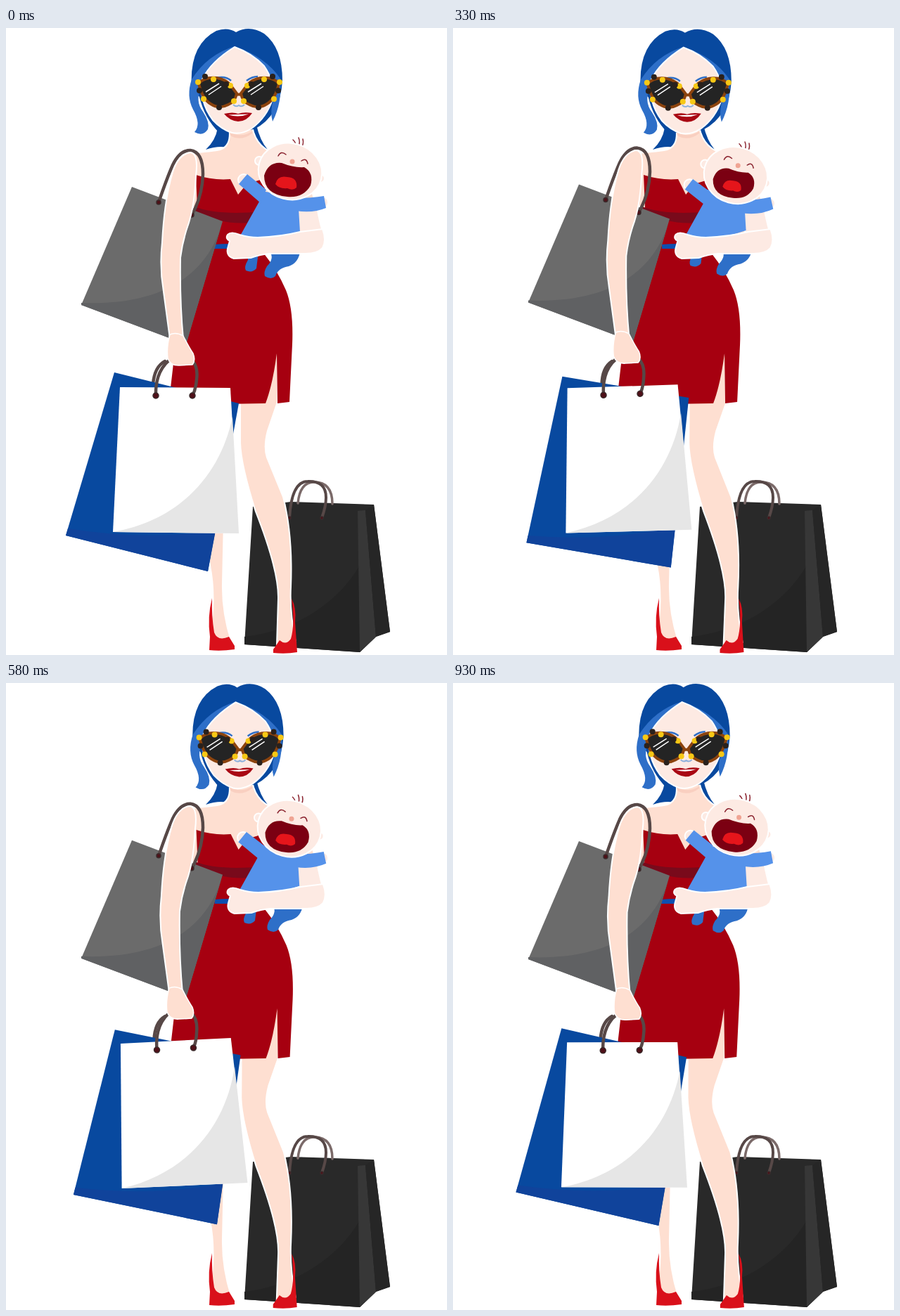
Write an HTML page that moves like this. It is 627 px wide and 892 px high and loops after 0.96 s.

```html
<!DOCTYPE html>
<html lang="en">
<head>
<meta charset="utf-8">
<title>Shopping with a baby</title>
<style>
html, body { margin: 0; width: 100%; height: 100%; overflow: hidden; background: #fff; }
svg { display: block; width: 627px; height: 892px; }
.skin { fill: #fedfd1; stroke: #fff; stroke-width: 2; }
.pale { fill: #fdeae3; stroke: #fff; stroke-width: 2; }
.red { fill: #a60010; }
.shoe { fill: #d9101a; }
.navy { fill: #08499f; }
.lock { fill: #2e6fc8; }
.sleeve { fill: #5592ea; }
.line { fill: none; stroke: #574847; stroke-width: 4.5; stroke-linecap: round; }
.thin { fill: none; stroke: #8b2430; stroke-width: 1.5; stroke-linecap: round; }
.stud { fill: #4f1018; stroke: #3a2a2b; stroke-width: 1.5; }
</style>
</head>
<body>
<svg viewBox="0 0 627 892">
  <defs>
    <path id="lens" d="M274 79Q282 69 300 71Q312 73 319 81L328 93Q326 105 316 109Q303 116 291 108Q279 101 274 79Z"/>
    <clipPath id="lensClip"><use href="#lens"/></clipPath>
  </defs>

  <g id="blackBag">
    <path fill="#292929" d="M351 681L405 674L523 678L546 859L526 866L503 888L339 877Z"/>
    <path fill="#242424" d="M516 735C496 798 428 856 339 866L339 877L503 888L526 866Z"/>
    <path fill="#373737" d="M500 687L511 686L526 866L503 888Z"/>
    <path fill="#262626" d="M511 686L523 678L546 859L526 866Z"/>
    <path class="line" style="stroke:#7b6a69;stroke-width:3.5" d="M415 676Q418 646 438 646Q464 646 464 677"/>
    <path class="line" style="stroke-width:4" d="M403 697Q406 645 429 645Q455 644 455 668Q455 680 449 697"/>
    <circle class="stud" cx="403" cy="697" r="2"/><circle class="stud" cx="449" cy="697" r="2"/>
  </g>

  <path class="skin" d="M282 700L290 765Q297 800 293 840L293 876L320 872Q307 830 308 790L310 700Z"/>
  <path class="shoe" d="M293 811Q286 838 290 866L289 885Q305 887 325 884V879L317 866Q301 873 296 860Q292 835 293 811Z"/>
  <g id="leg">
    <path class="skin" d="M333 500L333 590Q334 622 355 688Q388 772 387 812L385 878L412 874Q403 830 405 795Q408 722 394 667L371 611Q366 596 372 573L386 532V455Z"/>
    <path class="shoe" d="M406 812Q413 824 411 845L414 888Q398 891 380 889V884L389 871Q398 879 405 869Q411 848 406 812Z"/>
  </g>

  <path class="navy" d="M301 142Q298 160 284 173Q304 166 320 171V140ZM349 140V166Q360 168 372 173Q361 160 356 138Z"/>
  <path class="skin" d="M317 140Q322 171 300 174Q275 177 262 178Q245 184 240 212L270 262L420 300L450 300Q450 270 440 250Q425 190 390 180Q356 174 350 140Z"/>
  <path fill="#f9cfc0" d="M318 148Q334 157 350 147V150Q334 162 319 153Z"/>

  <g id="dress">
    <path class="red" d="M270 209Q294 217 319 215L330 237L342 222L368 214L366 320Q386 345 398 373Q409 400 407 450L403 532L386 534L385 463Q379 508 369 534L310 535L234 512L240 460L275 330Z"/>
    <path fill="#790a1b" d="M268 254Q300 267 365 261V275Q330 281 300 273L266 263Z"/>
    <path fill="#0e50b0" d="M296 308Q307 307 318 307V314L296 314Z"/>
  </g>

  <g id="head">
    <path class="navy" d="M264 85Q260 24 299 4Q315 -2 327 6Q346 -5 367 8Q393 28 393 75Q390 125 353 144L303 149Q282 128 275 98Z"/>
    <path class="lock" d="M325 26Q286 38 264 73Q256 97 266 116Q278 137 268 148Q280 155 287 144Q290 134 280 119Q268 103 278 84ZM325 26Q369 41 390 72Q393 106 379 133Q375 120 380 102L377 78Z"/>
    <path class="pale" d="M325 27Q291 48 279 73Q274 104 294 131Q306 144 321 149Q335 152 349 143Q371 127 379 101Q383 77 367 54Q350 36 325 27Z"/>
    <path fill="none" stroke="#2e6fc8" stroke-width="2.5" d="M299 71Q312 68 320 75M342 75Q350 69 358 69"/>
    <path fill="none" stroke="#8eb1dd" stroke-width="2" d="M323 109Q327 113 331 110Q335 113 339 109"/>
    <path fill="#a90713" d="M310 122Q323 119 330 122Q338 119 350 121Q342 133 330 133Q318 132 310 122Z"/>
    <path fill="#fff" d="M316 123.500Q330 123 345 122.500Q331 128 316 123.500Z"/>
    <g id="glasses"></g>
  </g>

  <g id="grayBag">
    <path fill="#6b6b6b" d="M179 226L308 275L256 450L107 394Z"/>
    <path fill="#606163" d="M308 275C285 360 210 395 107 391V394L256 450Z"/>
    <path class="line" d="M217 248Q229 213 237 195Q247 174 262 174Q280 176 280 208Q279 240 264 266"/>
    <circle class="stud" cx="217" cy="248" r="3"/><circle class="stud" cx="264" cy="266" r="3"/>
  </g>

  <g id="blueBag">
    <path class="line" d="M209 507Q211 482 226 474"/>
    <path class="navy" d="M154 490L331 534L287 773L85 722Z"/>
    <path fill="#10439b" d="M88 712Q200 730 298 715L287 773L85 722Z"/>
  </g>
  <g id="whiteBag">
    <path fill="#fff" d="M162 511L319 512L331 719L152 717Z"/>
    <path fill="#e6e6e6" d="M322 553C306 632 250 700 152 717L331 719Z"/>
    <path class="line" d="M213 523C211 455 278 450 271 500Q270 514 265 523"/>
    <circle class="stud" cx="213" cy="523" r="4"/><circle class="stud" cx="265" cy="523" r="4"/>
  </g>
  <g id="arm">
    <path class="skin" d="M262 177Q245 180 237 205Q225 245 222 305Q218 340 224 375L233 442L252 442Q247 390 248 327Q251 302 260 277Q268 252 270 210Q274 178 262 177Z"/>
    <path class="skin" style="stroke-width:1.500" d="M233 436Q228 454 230 470Q234 481 247 480L265 479Q270 473 266 463Q260 454 252 438Q242 432 233 436Z"/>
  </g>

  <path class="pale" d="M412 250L442 254Q446 278 454 303L416 300Z"/>
  <path id="footA" class="lock" d="M344 316L359 318L356 342Q350 349 341 345Q338 340 344 330Z"/>
  <path id="footB" class="lock" d="M375 318L418 318Q416 334 402 339Q387 341 383 353Q377 359 368 353Q366 347 371 339Q382 328 375 318Z"/>
  <path id="torso" class="sleeve" d="M350 230L360 247L331 299Q370 307 418 290L415 240Z"/>
  <g id="sleeves">
    <circle class="pale" cx="338" cy="216" r="8"/><circle class="pale" cx="450" cy="248" r="8"/>
    <path class="sleeve" d="M343 208L331 222L362 249L370 230ZM412 242Q435 242 452 239L455 256Q436 264 412 260Z"/>
  </g>
  <g id="babyHead">
    <path class="thin" d="M412 172Q413 163 408 159M415 171Q419 163 416 156M419 172Q424 165 422 158"/>
    <circle class="pale" cx="360" cy="189" r="6"/><circle class="pale" cx="447" cy="214" r="6"/>
    <ellipse class="pale" cx="404" cy="204" rx="45.500" ry="40" transform="rotate(14 404 204)"/>
    <path class="thin" d="M387 182Q391 174 398 180M420 189Q427 184 429 193"/>
    <circle cx="407" cy="190" r="3.500" fill="#f0a493"/>
    <g id="mouth">
      <path fill="#7b0012" d="M367 210Q373 190 392 192Q409 199 424 198Q438 206 433 224Q423 242 400 240Q367 237 367 210Z"/>
      <path fill="#e5151b" d="M383 222Q386 209 400 212Q415 213 413 227Q408 232 400 228Q388 229 383 222Z"/>
    </g>
  </g>
  <path id="forearm" class="pale" d="M418 290L450 286Q456 302 450 313Q443 321 426 321L375 321Q362 322 348 327L324 328Q313 325 315 314L318 303Q311 299 315 294Q320 289 332 294Q345 298 358 298Q390 297 418 290Z"/>
</svg>
<script>
const $ = id => document.getElementById(id);
const move = (id, x, y, extra = "") => $(id).setAttribute("transform", `translate(${x} ${y}) ${extra}`);

const yellow = [[273, 77], [295, 73], [319, 82], [324, 104], [281, 101]];
const dark = [[283, 69], [313, 80], [303, 113], [275, 89]];
const dots = (list, fill) =>
  list.map(([x, y]) => `<circle cx="${x}" cy="${y}" r="4" fill="${fill}"/>`).join("");
const rim = `<use href="#lens" fill="#242424" stroke="#8c430d" stroke-width="4"/>`
  + dots(yellow, "#f7c815") + dots(dark, "#2a211c");
const shine = `<path stroke="#fff" stroke-width="1.500" d="M284 91L303 79M288 95L306 83"/>
  <g clip-path="url(#lensClip)"><path class="flash" fill="#fff" d="M276 97L309 74L321 76L284 104Z"/></g>`;
$("glasses").innerHTML = `<path fill="none" stroke="#8c430d" stroke-width="4" d="M325 96Q331 93 337 96"/>
  ${rim}<g transform="translate(662 0) scale(-1 1)">${rim}</g>${shine}<g transform="translate(60 0)">${shine}</g>`;
const flashes = document.querySelectorAll(".flash");

function draw(now) {
  const step = Math.floor((now % 960 + 20) / 50);
  // Two sways per loop, the second slightly shorter
  const u = step < 10.3 ? step / 10.3 : (step - 10.3) / 9.4;
  const sway = Math.min(1, 2.2 * Math.min(u, 1 - u));
  const swing = Math.min(1, 5.2 * u, 1.95 * (1 - u));
  const lift = Math.sin(Math.PI * u);

  move("head", 4 * sway, sway);
  move("dress", 1.5 * sway, 0);
  move("leg", 0, 0, `translate(0 830) skewX(${-0.75 * sway}) translate(0 -830)`);
  move("grayBag", 0, -4 * lift);
  move("arm", -2 * lift, -3.5 * lift);
  move("blueBag", 2 * sway, 8 * sway, `rotate(${-6.25 * sway} 154 490)`);
  move("whiteBag", swing, 2 * swing, `rotate(${-3.45 * swing} 162 511)`);
  move("footA", -5 * sway, -10 * sway);
  move("footB", 10 * sway, -5 * sway);
  move("torso", -2 * sway, -3 * sway);
  move("sleeves", 0, 2 * sway, `rotate(${-4 * sway} 455 250)`);
  move("babyHead", -3 * sway, 8 * sway, `rotate(${2 * sway} 404 204)`);
  const open = 1 - 0.18 * sway;
  move("mouth", 400 + sway, 216 - sway, `scale(${open}) translate(-400 -216)`);
  move("forearm", 2 * sway, 0);
  for (const flash of flashes) {
    flash.style.display = Math.abs(step - 5) < 2 ? "" : "none";
    flash.setAttribute("transform", `translate(${(step - 5) * 14} 0)`);
  }
}

function tick() {
  draw(performance.now());
  requestAnimationFrame(tick);
}
tick();
</script>
</body>
</html>
```
